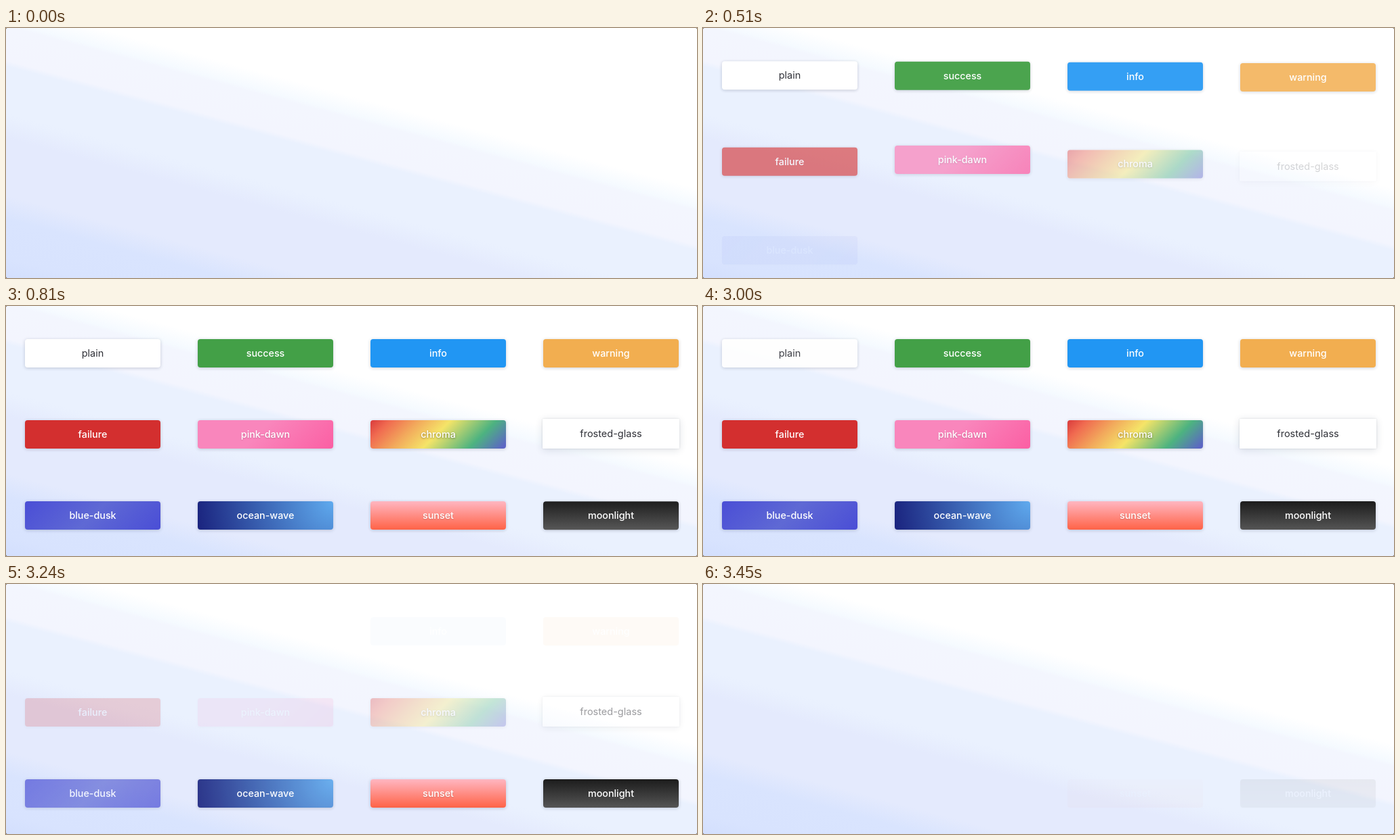
An HTML page for the animation above (3.57 s loop, 1020 by 370 pixels).

```html
<!DOCTYPE html>
<html lang="en">
<head>
<meta charset="utf-8">
<title>Button themes</title>
<style>
  html, body { margin: 0; width: 100%; height: 100%; overflow: hidden; }
  html { background: #444; }
  body {
    border-radius: 2px;
    background: linear-gradient(15deg,
      #d3dffd 0, #d8e3fe 28px, #d9e4fe 85px, #e4eafd 118px, #e4eafd 200px,
      #e9f0fe 228px, #eaf1fe 236px, #eaf1fe 303px, #f3f5fe 311px,
      #f3f6fe 360px, #f5faff 366px, #fff 392px);
  }
  .grid {
    display: grid;
    grid-template-columns: repeat(4, 200px);
    grid-auto-rows: 42px;
    gap: 78px 55px;
    padding: 49px 28px;
  }
  .button {
    border-radius: 4px;
    background: var(--fill);
    box-shadow: 0 1px 5px rgba(30, 40, 70, .22);
    color: #fff;
    font: 500 14.3px/42px Inter, Roboto, sans-serif;
    text-align: center;
    animation: show 3570ms calc(var(--i) * 26.5ms) infinite both;
  }
  .dark-text { color: #2f3037; font-weight: 400; font-size: 14.5px; }
  .text-shadow { text-shadow: 0 1px 2px rgba(0, 0, 0, .18); }
  .chroma { text-shadow: 0 1px 3px rgba(0, 0, 0, .4); }
  .frosted {
    margin: -2px -1px 0;
    height: 44px;
    line-height: 44px;
    border-radius: 1px;
    box-shadow: 0 2px 12px rgba(30, 40, 70, .14), 0 0 3px rgba(30, 40, 70, .14);
  }
  @keyframes show {
    0%, 7.9% { opacity: 0; transform: translateY(20px); animation-timing-function: ease; }
    15.46%, 83.42% { opacity: 1; transform: none; animation-timing-function: ease; }
    90.56%, 100% { opacity: 0; transform: none; }
  }
</style>
</head>
<body>
<div class="grid">
  <div class="button dark-text" style="--i: 0; --fill: #fff">plain</div>
  <div class="button" style="--i: 1; --fill: #43a047">success</div>
  <div class="button" style="--i: 2; --fill: #2196f3">info</div>
  <div class="button" style="--i: 3; --fill: #f2ae50">warning</div>
  <div class="button" style="--i: 5; --fill: #d32f2f">failure</div>
  <div class="button text-shadow" style="--i: 4; --fill: linear-gradient(135deg, #f986bc 45%, #fb5fa3)">pink-dawn</div>
  <div class="button chroma" style="--i: 6; --fill: linear-gradient(135deg, #d93a3c, #f06a50 12%, #f2a95c 30%, #f5e468 49%, #4db380 77%, #5c66c4 97%)">chroma</div>
  <div class="button dark-text frosted" style="--i: 7; --fill: #fff">frosted-glass</div>
  <div class="button" style="--i: 8; --fill: linear-gradient(135deg, #4a4ed6, #5f69d4 50%, #4a4ed6)">blue-dusk</div>
  <div class="button" style="--i: 9; --fill: radial-gradient(circle at top right, #5faaee, #1a237e)">ocean-wave</div>
  <div class="button text-shadow" style="--i: 10; --fill: linear-gradient(#ffb6c1, #ff6347)">sunset</div>
  <div class="button" style="--i: 11; --fill: linear-gradient(#1c1c1c, #555)">moonlight</div>
</div>
</body>
</html>
```
